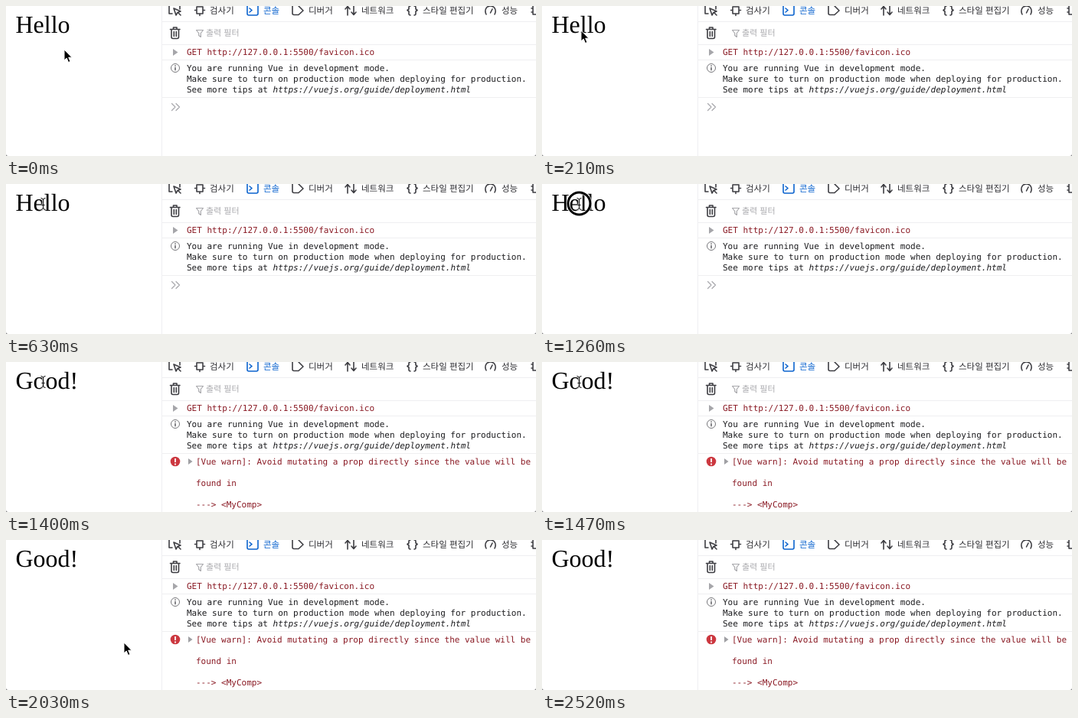
These frames come from a looping animation (692x196 px, 2590 ms). An HTML page:

```html
<!DOCTYPE html>
<html lang="ko">
<head>
<meta charset="utf-8">
<style>
  html, body { margin: 0; width: 100%; height: 100%; overflow: hidden; background: #fff; }
  svg { display: block; width: 692px; height: 196px; text-rendering: geometricPrecision; }
  text { white-space: pre; }
  .page { font: 32px "Liberation Serif", serif; }
  .mono { font: 11px "DejaVu Sans Mono", monospace; fill: #1c1c1f; }
  .mono.error { fill: #8a1a24; }
  .ui { font: 11.5px "Noto Sans CJK KR", "Noto Sans CJK", sans-serif; fill: #2b2b2f; }
  .ui .active { fill: #0b63ce; }
  .ui.hint { font-size: 11px; fill: #aaaaae; }
  .icon { fill: none; stroke: #3e3e43; stroke-width: 1.6; stroke-linejoin: round; stroke-linecap: round; }
  .icon.faint { stroke: #a8a8ac; stroke-width: 1.2; }
  .rule { stroke: #efeff1; }
</style>
</head>
<body>
<svg viewBox="0 0 692 196">
  <defs>
    <path id="beamShape" d="M45.500 18.500Q48.500 18.500 48.500 21V31Q48.500 33.500 45.500 33.500M51.500 18.500Q48.500 18.500 48.500 21M48.500 31Q48.500 33.500 51.500 33.500M46.500 27.500H50.500"/>
  </defs>
  <rect width="692" height="196" fill="#fff"/>
  <text id="greeting" class="page" x="12.500" y="35">Hello</text>

  <!-- panel dividers -->
  <path class="rule" d="M203.500 0V196M204 20.500H692M204 50.500H692M204 70.500H692M204 119.500H692"/>

  <!-- tab bar -->
  <g class="icon">
    <path d="M227 4V0M213 0V10H217M219 3L228 7L224 8.500L222 12ZM225 9L228 12"/>
    <path d="M249 1H257V10H249ZM246.500 5.500H249M257 5.500H259.500M253 10V12.500"/>
    <path stroke="#0b63ce" style="stroke:#0b63ce" d="M315 0V10Q315 12 317 12H327Q329 12 329 10V0M318 3L321 5.500L318 8"/>
    <path d="M374 0V9.500Q374 11.500 376 11.500H382L388 6L382 0"/>
    <path d="M446 12V1M443 4L446 0.500L449 4M454 0V11M451 8L454 11.500L457 8"/>
    <path d="M528 0Q526 0 526 2V4L524 5.500L526 7V10Q526 12 528 12M533 0Q535 0 535 2V4L537 5.500L535 7V10Q535 12 533 12"/>
    <path d="M627 11Q624.500 6 627.500 2Q632.500 -2 637.500 2Q640.500 6 638 11M632.500 9L635 4"/>
    <path d="M688 0V11H692M686 3H688M686 8H688"/>
  </g>
  <g class="ui">
    <text x="266" y="10">검사기</text>
    <text x="336" y="10" class="active">콘솔</text>
    <text x="395" y="10">디버거</text>
    <text x="464" y="10">네트워크</text>
    <text x="544" y="10">스타일 편집기</text>
    <text x="647" y="10">성능</text>
  </g>

  <!-- filter bar -->
  <path class="icon" d="M214.500 30.500H227M218.500 30V28H223V30M216 31V40.500Q216 42.500 218 42.500H223.500Q225.500 42.500 225.500 40.500V31M219.300 33.500V39.500M222.300 33.500V39.500"/>
  <path class="icon faint" d="M248.500 31.500H257.500L254.300 35.500V40.500L251.700 38.500V35.500Z"/>
  <text class="ui hint" x="261" y="39">출력 필터</text>

  <!-- messages -->
  <path fill="#a6a6aa" d="M218 56L224.500 60.500L218 65Z"/>
  <text class="mono error" x="236" y="64">GET http://127.0.0.1:5500/favicon.ico</text>
  <circle cx="221" cy="81" r="5.500" fill="none" stroke="#77777b"/>
  <path stroke="#55555a" stroke-width="1.400" d="M221 80V84.300M221 77.500V78.900"/>
  <g class="mono">
    <text x="236" y="85">You are running Vue in development mode.</text>
    <text x="236" y="99">Make sure to turn on production mode when deploying for production.</text>
    <text x="236" y="113">See more tips at <tspan font-style="italic">https://vuejs.org/guide/deployment.html</tspan></text>
  </g>
  <path id="prompt" class="icon faint" d="M216.500 127.500L221 132L216.500 136.500M222 127.500L226.500 132L222 136.500"/>

  <g id="warning">
    <circle cx="221" cy="130" r="6.300" fill="#cc3840"/>
    <path stroke="#fff" stroke-width="1.800" d="M221 126V131M221 132.600V134.400"/>
    <path fill="#a0a0a4" d="M238 126L243.500 130L238 134Z"/>
    <g class="mono error">
      <text x="248" y="134">[Vue warn]: Avoid mutating a prop directly since the value will be</text>
      <text x="248" y="162">found in</text>
      <text x="248" y="190">---&gt; &lt;MyComp&gt;</text>
    </g>
  </g>

  <!-- window corners -->
  <path fill="#77777a" d="M0 193Q0 196 3 196H0ZM692 193Q692 196 689 196H692Z"/>

  <!-- pointers -->
  <g id="ring" fill="none">
    <circle cx="48.500" cy="25.500" r="14.500" stroke="#fff" stroke-opacity=".7" stroke-width="5"/>
    <circle cx="48.500" cy="25.500" r="14.500" stroke="#000" stroke-width="3"/>
  </g>
  <g id="beam" fill="none">
    <use href="#beamShape" stroke="#fff" stroke-width="2.600"/>
    <use href="#beamShape" stroke="#000"/>
  </g>
  <path id="arrow" fill="#000" stroke="#fff" d="M0 -1V13L3.200 10L5.500 15.500L8 14.500L5.700 9.200H10Z"/>
</svg>
<script>
const LOOP = 2590, STEP = 70;
const part = id => document.getElementById(id);
const show = (id, on) => part(id).style.display = on ? "" : "none";
const within = (t, from, to) => t >= from && t < to;

// Pointer waypoints: [time, x, y]
const approach = [[0, 76, 58], [70, 71, 53], [140, 59, 41], [210, 51, 33], [280, 49, 28], [350, 48, 26]];
const departure = [[1960, 100, 78], [2030, 154, 135], [2100, 215, 122], [2240, 420, 55], [2380, 562, 3], [2450, 570, 0]];

function along(path, t) {
  const i = path.findIndex(point => point[0] > t);
  const [t0, x0, y0] = path[i - 1], [t1, x1, y1] = path[i];
  const k = (t - t0) / (t1 - t0);
  return [x0 + (x1 - x0) * k, y0 + (y1 - y0) * k];
}

function draw(t) {
  const clicked = t >= 1400;
  part("greeting").textContent = clicked ? "Good!" : "Hello";
  show("warning", clicked);
  show("prompt", !clicked);
  show("ring", within(t, 490, 630) || within(t, 1260, 1400));
  show("beam", within(t, 350, 1960));

  const path = t < 350 ? approach : within(t, 1960, 2450) ? departure : null;
  show("arrow", path);
  if (path) part("arrow").setAttribute("transform", `translate(${along(path, t)})`);
}

function tick() {
  const t = performance.now() % LOOP;
  draw(Math.floor(t / STEP) * STEP);
  requestAnimationFrame(tick);
}
tick();
</script>
</body>
</html>
```
